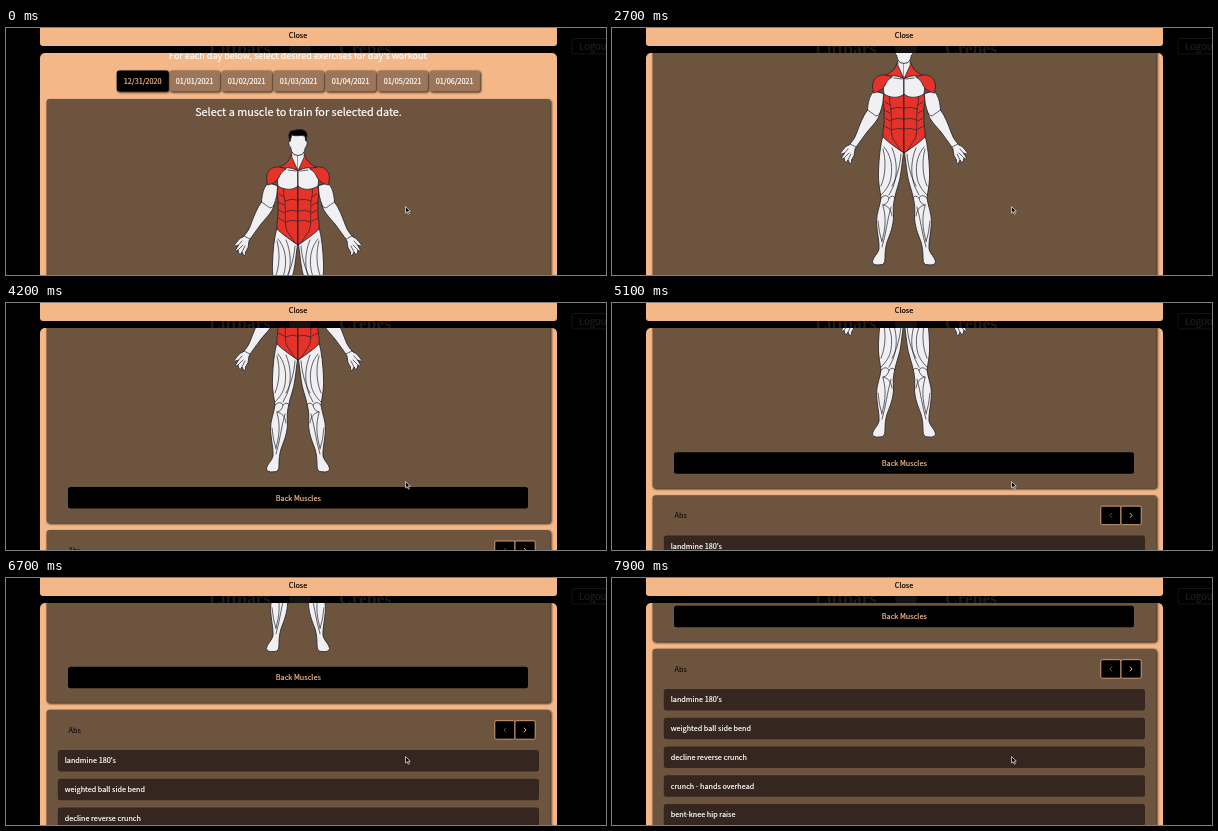
Write an HTML page that moves like this. It is 600 px wide and 247 px high and loops after 8 s.

```html
<!DOCTYPE html>
<html lang="en">
<head>
<meta charset="utf-8">
<title>Workout planner</title>
<style>
html, body { margin: 0; width: 100%; height: 100%; overflow: hidden; background: #000; }
svg { display: block; width: 100%; height: 100%; }
text {
  font: 500 7.25px "Noto Sans CJK JP", "Noto Sans CJK SC", "Noto Sans CJK", "Noto Sans", sans-serif;
  color: #fff;
  fill: currentColor;
  stroke: currentColor;
  stroke-width: .2px;
}
.mid { text-anchor: middle; }
.brand { font: bold 17.5px "Liberation Serif", serif; color: #1d1b19; stroke: none; }
rect.peach { fill: #f4b787; }
text.peach { color: #f4b787; }
.card { fill: #6d543f; }
.shadow { filter: drop-shadow(1.7px 1.7px 1px rgba(0, 0, 0, .85)); }
.skin, .red, .hair, .line { stroke: #25252b; stroke-width: .85; stroke-linejoin: round; stroke-linecap: round; }
.skin { fill: #f0eff1; }
.red { fill: #e5332a; }
.hair { fill: #000; }
.line { fill: none; stroke-width: .7; }
.nav { stroke: #f4b787; stroke-width: .8; }
.arrow { fill: none; stroke-width: 1; }
</style>
</head>
<body>
<svg viewBox="0 0 600 247">
  <defs>
    <clipPath id="panel"><rect x="34" y="25" width="517" height="240" rx="5"/></clipPath>
    <g id="half">
      <!-- leg -->
      <path class="skin" d="M271 199C268 211 267 222 266.500 235C266 247 268 254 269 262C268 270 264.500 277 264.500 286C265 297 267.500 305 267 313C266 318 261 321 260.300 326Q261 329 265 329L271 328.500Q273.500 326 273 321C273 316 273.500 311 275 306C278 298 281.500 290 281.500 280C281 274 281 269 282.500 263C284 254 288 246 289 236C290 229 290.500 223 291.500 217Z"/>
      <path class="line" d="M272 211C278 218 281 228 279 241C278 249 273 255 269 259M271 213C274 224 274 238 269 250M280 212C285 224 286 238 281 251L277 259M289 218C288 230 285 241 280 250M269 262Q274 257 277 262Q276 268 271 269M277 262Q281 258 283 262M271 269C276 270 279 273 280 280M271 270C274 280 274 291 270 305M279 271C275 285 274 298 270 311M266 285Q267 297 270 306"/>
      <!-- arm and hand -->
      <path class="skin" d="M262 155C257 160 256 167 255.500 174C251 180 248 188 245 196C243 202 240 206 237 209C233 210 231 214 228.500 217Q229 219 232.500 217L229.500 222Q230 224 232 222L233 226Q234.500 227.500 236 224L238 228Q240 227 239.500 224Q243 220 243 213C246 208 250 203 255 196C261 189 267 183 268 177C270 171 272 165 271.500 158Z"/>
      <path class="line" d="M255.500 174Q260 177 264 180Q267 180 268 177M232.500 217L236 213M232 222L237 217M236 224L239 218M238 208L244 211"/>
      <!-- torso -->
      <path class="red" d="M292 158H272C270 166 273 172 272 180C273 188 270 195 271 201C277 207 286 213 292 217Z"/>
      <path class="line" d="M278 160C276 166 280 171 279 178C280 187 278 195 281 203Q286 210 289 215M279 173Q285 170 292 172M279 184Q285 181 292 183M279 194Q286 191 292 193M273 166L278 169M272 174L278 177M273 182L278 185M272 190L278 193"/>
      <path class="red" d="M285 127Q283 136 273 139Q281 143 292 141V127Z"/>
      <path class="skin" d="M292 143C286 139 278 139 273 141C271 147 271 153 272 158C278 162 287 163 292 158Z"/>
      <path class="red" d="M273 139C265 138 261 143 260.500 150L261.500 157C267 156 272 153 274 147Q276 143 280 141Z"/>
      <!-- neck -->
      <path class="skin" d="M292 142Q288 134 285.800 129V120H292Z" style="stroke:none"/>
      <path class="line" d="M285.800 124V129Q288 134 291 141M282 142L290 143"/>
    </g>
  </defs>

  <g id="page">
    <text class="brand" x="203" y="26">Liftbars</text>
    <circle cx="294" cy="20" r="11" fill="#121212"/>
    <text class="brand" x="333" y="26">Crepes</text>
    <rect x="566" y="10.500" width="50" height="15.500" rx="2" fill="none" stroke="#151414"/>
    <text x="573" y="22" style="font-size:9.500px;color:#211d1c">Logout</text>
  </g>

  <rect class="peach" x="34" y="-6" width="517" height="24" rx="3"/>
  <text class="mid" x="292" y="10.300" style="color:#000">Close</text>

  <g clip-path="url(#panel)">
    <rect class="peach" x="34" y="25" width="517" height="240"/>
    <g id="scroll">
      <text class="mid" x="292" y="30.800" style="font-size:9px">For each day below, select desired exercises for day's workout</text>
      <g id="dates"></g>

      <rect class="card shadow" x="40.500" y="71" width="504" height="309" rx="3"/>
      <text class="mid" x="292.500" y="88" style="font-size:10.850px">Select a muscle to train for selected date.</text>
      <g id="body">
        <use href="#half"/>
        <use href="#half" transform="translate(584) scale(-1 1)"/>
        <path class="line" d="M292 142V217"/>
        <path class="skin" d="M284 107L284 113Q282 113 283.300 118L284.500 119Q285 124 288 126.500Q292 128.500 296 126.500Q299 124 299.500 119L300.700 118Q302 113 300 113L300 107Z"/>
        <path class="hair" d="M284 113C281 105 284 102 288 102.500C293 100.500 302 101 301 108L300 113L298.800 108C294 106.500 290 109 286 107Z"/>
      </g>
      <rect x="62" y="344" width="460" height="21.500" rx="2.500"/>
      <text class="mid peach" x="292.300" y="357.600">Back Muscles</text>

      <rect class="card shadow" x="40.500" y="387" width="504" height="220" rx="3"/>
      <text x="62.500" y="410" style="color:#000;stroke:none">Abs</text>
      <rect class="nav" x="488.800" y="398" width="20.200" height="18.500" rx="1.500"/>
      <rect class="nav" x="509" y="398" width="20.200" height="18.500" rx="1.500"/>
      <path class="arrow" stroke="#6b513d" d="M500 405l-2 2.300l2 2.300"/>
      <path class="arrow" stroke="#f4b787" d="M518 405l2 2.300l-2 2.300"/>
      <g id="rows"></g>
    </g>
  </g>

  <path d="M399.500 178.500v6.500l1.600-1.400l1.200 2.600l1.100-.5l-1.200-2.500h2.100z" stroke="#eee" stroke-width=".7"/>
</svg>
<script>
const byId = id => document.getElementById(id);
const days = ['12/31/2020', ...[1, 2, 3, 4, 5, 6].map(d => `01/0${d}/2021`)];
const exercises = ["landmine 180's", 'weighted ball side bend', 'decline reverse crunch',
  'crunch - hands overhead', 'bent-knee hip raise'];

byId('dates').innerHTML = days.map((day, i) => {
  const x = 136.7 + 52 * i, w = i ? 50.5 : 52;
  return `<rect class="shadow" x="${x - w / 2}" y="42.5" width="${w}" height="21" rx="2.5"
    fill="${i ? '#9c765a' : '#000'}"/><text class="mid ${i ? '' : 'peach'}" x="${x}" y="55.8">${day}</text>`;
}).join('');

byId('rows').innerHTML = exercises.map((name, i) => {
  const y = 427.3 + 28.75 * i;
  return `<rect x="51.8" y="${y}" width="481.2" height="21.5" rx="2.5" fill="#35271f"/>
    <text x="58.8" y="${y + 13.4}">${name}</text>`;
}).join('');

// [time in ms, scroll offset in px]
const keys = [[0, 0], [1400, 60.5], [2700, 92], [4200, 160], [5800, 222], [6700, 255.3], [7900, 316.3]];

function offset(t) {
  const i = Math.max(1, keys.findIndex(k => k[0] >= t));
  const [t0, y0] = keys[i - 1], [t1, y1] = keys[i];
  return y0 + (y1 - y0) * (t - t0) / (t1 - t0);
}

function draw(now) {
  const t = Math.floor(now % 8000 / 100) * 100;
  byId('scroll').setAttribute('transform', `translate(0 ${-offset(t)})`);
  requestAnimationFrame(draw);
}
draw(performance.now());
</script>
</body>
</html>
```
